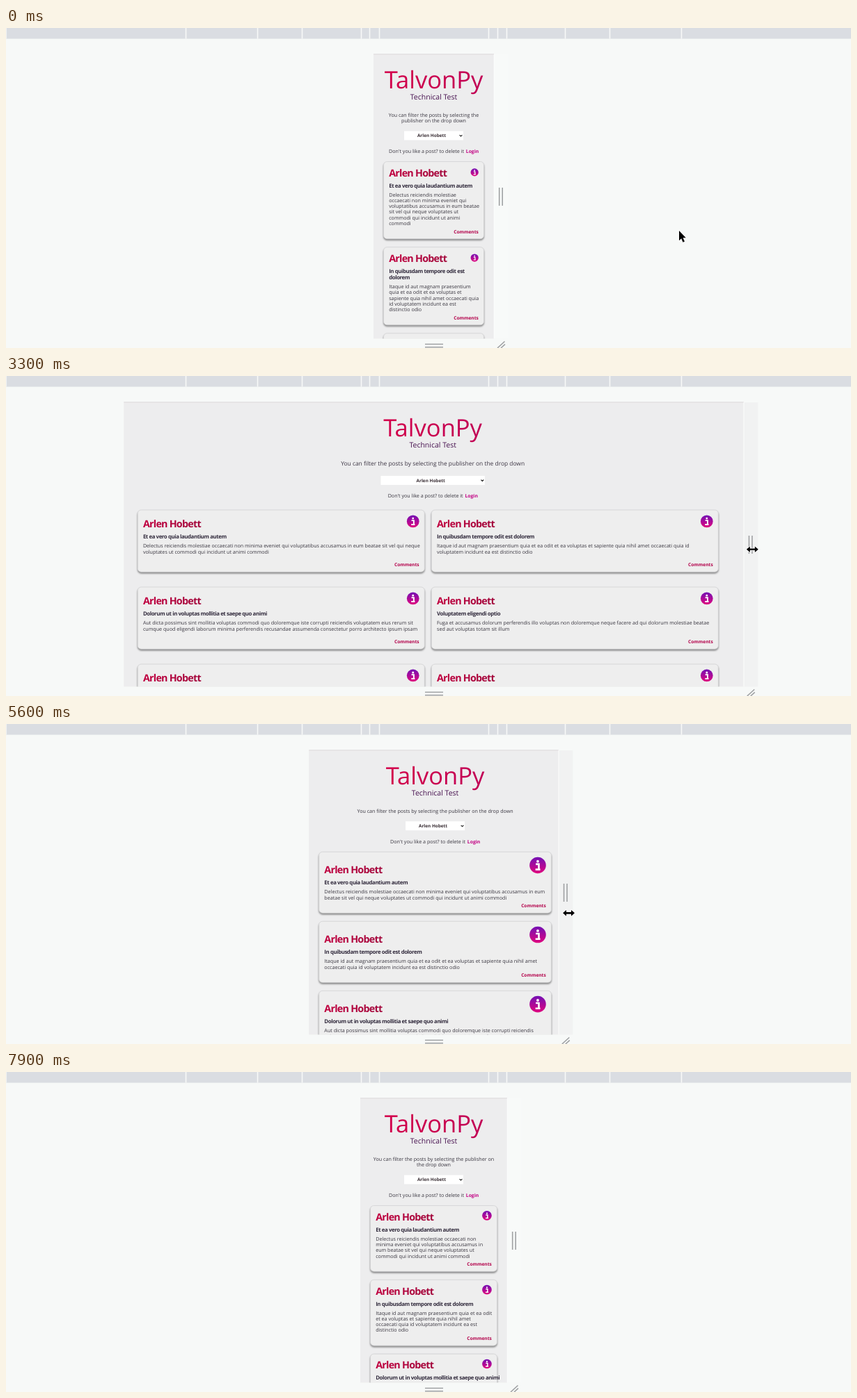
Animation of 1214 by 461 pixels, one loop 8 s. Source, as an HTML page:

```html
<!DOCTYPE html>
<html lang="en">
<head>
<meta charset="utf-8">
<title>Responsive resize</title>
<style>
  html, body { margin: 0; width: 100%; height: 100%; overflow: hidden; background: #f7f9f8; }
  svg { display: block; width: 1214px; height: 461px; }
  text { font-family: "Open Sans", "Noto Sans", sans-serif; text-rendering: geometricPrecision; white-space: pre; }
  .card { fill: #eeeeee; stroke: #d2d2d4; stroke-width: .8; filter: drop-shadow(0 2px 1px rgba(0, 0, 0, .42)); }
</style>
</head>
<body>
<svg viewBox="0 0 1214 461" xmlns="http://www.w3.org/2000/svg">
  <defs>
    <linearGradient id="title"><stop stop-color="#d3004a"/><stop offset="1" stop-color="#c10055"/></linearGradient>
    <linearGradient id="name"><stop stop-color="#c0003f"/><stop offset="1" stop-color="#a3083c"/></linearGradient>
    <linearGradient id="badge" x2="0" y2="1"><stop stop-color="#7410b4"/><stop offset="1" stop-color="#e0047e"/></linearGradient>
    <clipPath id="clip"><rect id="clipBox" y="38" height="409.5"/></clipPath>
  </defs>
  <rect width="1214" height="461" fill="#f7f9f8"/>
  <rect width="1214" height="15.5" fill="#dadde2"/>
  <g id="ticks" stroke="#f7f9f8" stroke-width="1.6"></g>
  <path d="M602 455.5H628M602 459.7H628" stroke="#a0a2a4" stroke-width="1.5"/>
  <g id="frame"></g>
  <g id="page" clip-path="url(#clip)"></g>
  <g id="cursor"></g>
</svg>
<script>
const $ = id => document.getElementById(id);
const LOOP = 8000, MID = 614.5, TOP = 38, END = 447.5;
const BRAND = 'TalvonPy', AUTHOR = 'Arlen Hobett';
const INTRO = 'You can filter the posts by selecting the publisher on the drop down';
const POSTS = [
  ['Et ea vero quia laudantium autem', 'Delectus reiciendis molestiae occaecati non minima eveniet qui voluptatibus accusamus in eum beatae sit vel qui neque voluptates ut commodi qui incidunt ut animi commodi'],
  ['In quibusdam tempore odit est dolorem', 'Itaque id aut magnam praesentium quia et ea odit et ea voluptas et sapiente quia nihil amet occaecati quia id voluptatem incidunt ea est distinctio odio'],
  ['Dolorum ut in voluptas mollitia et saepe quo animi', 'Aut dicta possimus sint mollitia voluptas commodi quo doloremque iste corrupti reiciendis voluptatem eius rerum sit cumque quod eligendi laborum minima perferendis recusandae assumenda consectetur porro architecto ipsum ipsam'],
  ['Voluptatem eligendi optio', 'Fuga et accusamus dolorum perferendis illo voluptas non doloremque neque facere ad qui dolorum molestiae beatae sed aut voluptas totam sit illum']
];

// size, weight, letter spacing, fill
const STYLE = {
  title: [34.5, 400, 0, 'url(#title)'],
  sub: [10.5, 400, 0, '#47114f'],
  intro: [8.42, 400, 0, '#3d3644'],
  body: [7.15, 400, 0, '#38353f'],
  pick: [6.4, 700, 0, '#3a2f35'],
  login: [6.8, 700, 0, '#c20083'],
  name: [14.3, 700, -.75, 'url(#name)'],
  head: [7.8, 700, -.4, '#332c3e'],
  link: [6.6, 700, 0, '#b3004a']
};

// letter widths for line breaking, relative to "n"
const WIDTHS = { ' ': .4, i: .43, l: .45, I: .47, t: .68, r: .68, f: .68, s: .78, c: .83, v: .87, a: .93, e: .99, m: 1.51, D: 1.25 };
for (const c of 'bdopq') WIDTHS[c] = 1.03;

// time, half width of the page, pointer offset from its right edge, pointer y
const DRAG = [
  [1900, 86.5, 12, 242], [2000, 96, 13, 242], [2300, 248, 14, 241], [2600, 386, 15, 240],
  [2700, 364.7, 15, 240], [2800, 368, 14, 241], [3000, 405, 13, 245], [3700, 499, 12, 256],
  [3900, 515.7, 11, 258], [4050, 527, 11, 259], [4200, 526, 11, 260], [4400, 521, 12, 260],
  [4600, 521, 12, 260], [4700, 503, 14, 261], [4900, 405, 15, 263], [5000, 359.5, 15, 264],
  [5500, 200, 15, 271], [5800, 138, 14, 275], [6000, 114, 13, 278], [6200, 105.5, 13, 279]
];
// time, x, y of the free pointer
const APPROACH = [[300, 967, 292], [500, 900, 280], [900, 682, 248], [1200, 716, 241], [1400, 713, 242]];
const LEAVE = [[6700, 733, 279], [6800, 738, 283], [6900, 752, 294], [7100, 761, 306]];

function track(rows, t) {
  const i = rows.findIndex(r => r[0] >= t);
  if (i < 0) return rows[rows.length - 1].slice(1);
  if (!i) return rows[0].slice(1);
  const a = rows[i - 1], b = rows[i], k = (t - a[0]) / (b[0] - a[0]);
  return a.slice(1).map((v, j) => v + (b[j + 1] - v) * k);
}

function measure(s, style) {
  const [size, , gap] = STYLE[style];
  return [...s].reduce((sum, c) => sum + (WIDTHS[c] || 1) * size * .5875 + gap, 0);
}

function wrap(s, style, max) {
  const lines = [];
  let line = '';
  for (const word of s.split(' ')) {
    const next = line ? line + ' ' + word : word;
    if (line && measure(next, style) > max) {
      lines.push(line);
      line = word;
    } else line = next;
  }
  return lines.concat(line);
}

function text(s, x, y, style, anchor = 'start') {
  const [size, weight, gap, fill] = STYLE[style];
  return `<text x="${x}" y="${y}" font-size="${size}" font-weight="${weight}" letter-spacing="${gap}" fill="${fill}" text-anchor="${anchor}">${s}</text>`;
}

const rect = (x, y, w, h, fill) => `<rect x="${x}" y="${y}" width="${w}" height="${h}" fill="${fill}"/>`;

function badge(right, bottom, d) {
  const r = d / 2;
  return `<g transform="translate(${right - r} ${bottom - r}) scale(${r / 10})"><circle r="10" fill="url(#badge)"/>` +
    `<circle cy="-4.8" r="1.6" fill="#fff"/><path d="M-2.4 -1.4H1.3V5M-2.8 5.2H3" fill="none" stroke="#fff" stroke-width="2.2"/></g>`;
}

function card(x, y, w, post, small, d) {
  const left = x + 7.7, right = x + w - 7.7;
  const base = y + Math.max(21, 7.5 + d);
  let out = text(AUTHOR, left, base, 'name') + badge(right, base, d);
  let at = base + 16;
  const put = (s, style, step) => wrap(s, style, right - left).forEach((line, i) => {
    if (i) at += step;
    out += text(line, left, at, style);
  });
  put(post[0], 'head', 9.2);
  at += 13;
  put(post[1], 'body', 8.3);
  at += small ? 11.5 : 18.5;
  out += text('Comments', right, at, 'link', 'end');
  const box = `<rect class="card" x="${x}" y="${y}" width="${w}" height="${at + 8.2 - y}" rx="5"/>`;
  return { svg: box + out, next: at + (small ? 20.2 : 30) };
}

function page(left, w) {
  const small = w < 384, cx = left + w / 2;
  let out = text(BRAND, cx, 87, 'title', 'middle') + text('Technical Test', cx, 103.3, 'sub', 'middle');
  const intro = small ? wrap(INTRO, 'body', w - 35) : [INTRO];
  intro.forEach((s, i) => out += text(s, cx, (small ? 128 : 129) + 8.3 * i, small ? 'body' : 'intro', 'middle'));
  const dy = small ? (intro.length - 2) * 8.3 : -4.6;
  const half = small ? 42.5 : 74.7, mid = 155 + dy;
  out += rect(cx - half, mid - 6.5, half * 2, 13, '#fff') + text(AUTHOR, cx - 3, mid + 2.3, 'pick', 'middle') +
    `<path d="M${cx + half - 5.4} ${mid - .9}l1.9 1.9 1.9 -1.9" fill="none" stroke="#222" stroke-width="1.1"/>` +
    text("Don't you like a post? to delete it", cx - 64.5, 180 + dy, 'body') + text('Login', cx + 46.3, 180 + dy, 'login');

  const d = w * (small ? .065 : .02);
  const cols = small ? 1 : 2;
  const cw = small ? w - 29 : (w * .9636 - 31.4) / 2;
  let y = small ? 192.5 + dy : 193;
  for (let n = 0; y < END; n += cols) {
    let next = 0;
    for (let c = 0; c < cols; c++) {
      const one = card(left + (small ? 14.5 : 20) + c * (cw + 10), y, cw, POSTS[(n + c) % POSTS.length], small, d);
      out += one.svg;
      next = Math.max(next, one.next);
    }
    y = next;
  }
  return out;
}

function frame(left, right, grip) {
  return rect(right, TOP, 20.5, END - TOP, grip) +
    rect(left, TOP, right - left, END - TOP, '#ededee') +
    rect(left, TOP - .7, right - left, 1, '#dcd8da') +
    rect(right - .3, TOP, 1, END - TOP, '#fcfcfc') +
    `<path d="M${right + 7.7} 230V256M${right + 12.2} 230V256M${right + 5} 461L${right + 15.5} 451.5M${right + 10} 461L${right + 16} 455.7" stroke="#a0a2a4" stroke-width="1.6"/>`;
}

function pointer(x, y, wide) {
  const d = wide ? 'M-8.5 0L-3.5 -4.3V-1.3H3.5V-4.3L8.5 0L3.5 4.3V1.3H-3.5V4.3Z'
    : 'M0 0V14.2L3.2 11.2L5.6 16.7L8 15.6L5.6 10.3H9.8Z';
  return `<path transform="translate(${x} ${y})" d="${d}" stroke="#fff" stroke-width="1.4" paint-order="stroke"/>`;
}

function draw(t) {
  const [half, off, dragY] = track(DRAG, t);
  const left = MID - half, right = MID + half;
  const dragging = t >= 2000 && t < 6800;
  let x = right + off, y = dragY;
  if (t < 2000) [x, y] = track(APPROACH, t);
  if (t >= 6800) [x, y] = track(LEAVE, t);
  const over = x > right && x < right + 20;
  const shown = t < 7200;
  const grip = dragging ? (t < 6200 ? '#f1f2f2' : '#f6f8f7') : shown && over ? '#dadde2' : '#f8faf9';

  $('clipBox').setAttribute('x', left);
  $('clipBox').setAttribute('width', half * 2);
  $('frame').innerHTML = frame(left, right, grip);
  // the page reflows slightly behind the window edge
  $('page').innerHTML = page(left, 2 * track(DRAG, t - 10)[0]);
  $('cursor').innerHTML = shown ? pointer(x, y, dragging || over) : '';
}

$('ticks').innerHTML = [0, 258.5, 361.5, 425.5, 510.5, 522.5, 536.5, 693.5, 706.5, 719.5, 803.5, 867.5, 970.5]
  .map(x => `<path d="M${x} 0V15.5"/>`).join('');

let last = -1;
function tick(now) {
  const t = Math.floor(now % LOOP / 100) * 100;
  if (t !== last) draw(last = t);
  requestAnimationFrame(tick);
}
draw(0);
requestAnimationFrame(tick);
</script>
</body>
</html>
```
